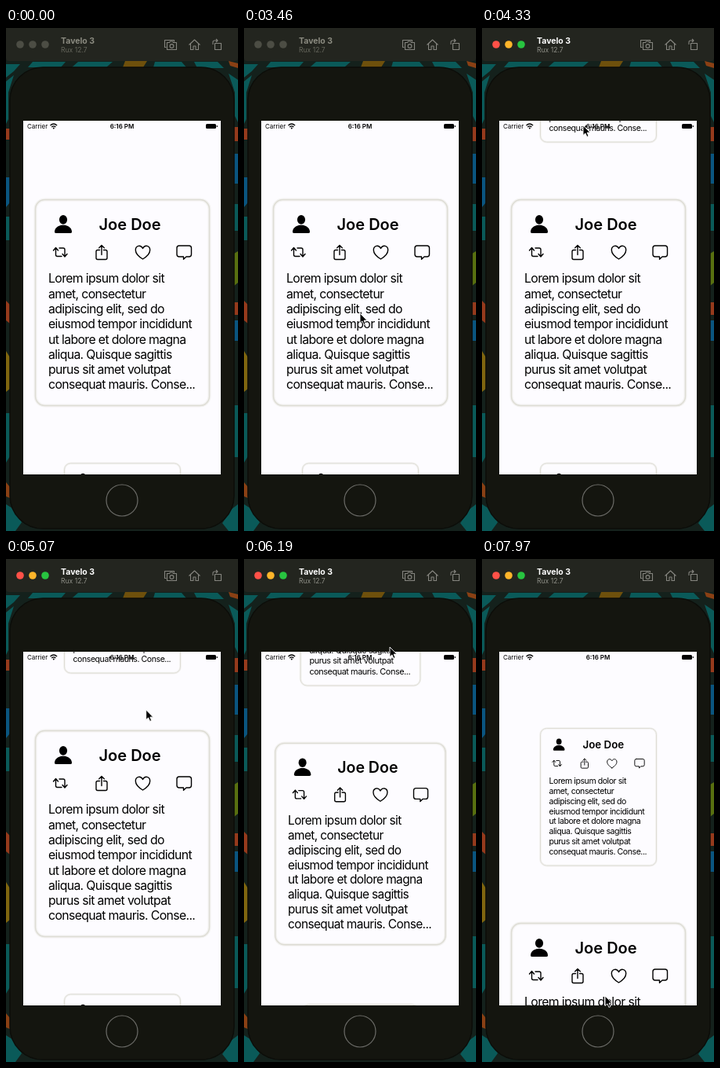
Animation, 296 px wide and 640 px high, one loop 7.99 s. Source, as an HTML page:

```html
<!DOCTYPE html>
<html lang="en">
<head>
<meta charset="utf-8">
<title>Card carousel</title>
<style>
  html, body { margin: 0; width: 100%; height: 100%; overflow: hidden; background: #14150f; }
  svg { display: block; width: 100vw; height: 100vh; font-family: Inter, "Open Sans", sans-serif; }
  .line { fill: none; stroke: #000; stroke-width: 1.4; stroke-linecap: round; stroke-linejoin: round; }
  .tool { fill: none; stroke: #85857f; stroke-width: 1.1; stroke-linejoin: round; }
  .name { font-size: 20px; font-weight: 600; }
  .body { font-size: 15.8px; letter-spacing: -0.04em; }
  .status { font-size: 8px; }
  .light { fill: #4c4d44; }
  .heading { font-size: 10.5px; font-weight: 700; fill: #8b8b80; }
  .sub { font-size: 8.6px; fill: #66675d; }
  .active .heading { fill: #fff; }
  .active .sub { fill: #8f9088; }
  .active .red { fill: #ff5148; }
  .active .amber { fill: #ffb52a; }
  .active .green { fill: #28c440; }
</style>
</head>
<body>
<svg viewBox="0 0 296 640" preserveAspectRatio="none">
  <defs>
    <clipPath id="screen"><rect x="22" y="118" width="252" height="450"/></clipPath>
    <g id="card">
      <g transform="translate(-148.5 -349.5)">
        <rect x="37.5" y="218.5" width="222" height="262" rx="12" fill="#fdfcff" stroke="#f3f2f1" stroke-width="4"/>
        <rect x="37.5" y="218.5" width="222" height="262" rx="12" fill="none" stroke="#dddcd4" stroke-width="1.4"/>
        <ellipse cx="73" cy="243.8" rx="5.1" ry="5.9"/>
        <path d="M62 259.5c0-6 6-8.7 11-8.7s11 2.7 11 8.7q0 1.5-2 1.5H64q-2 0-2-1.5z"/>
        <text class="name" x="118.5" y="257">Joe Doe</text>
        <path class="line" d="M60.5 283l3-3.5 3 3.5M63.5 280v8.5q0 2 2 2H71M68 280h5q2 0 2 2v8.5M72 287.500l3 3.500 3-3.500"/>
        <path class="line" d="M119.500 282.500H117q-2 0-2 2v8q0 2 2 2h10q2 0 2-2v-8q0-2-2-2h-2.500M122 288.500v-12M118.700 279.700l3.300-3.300 3.300 3.300"/>
        <path class="line" d="M174.500 294c-5-3-9.200-7-9.200-11.500 0-5.800 6.700-7.200 9.200-2 2.500-5.200 9.200-3.800 9.200 2 0 4.500-4.200 8.500-9.200 11.500z"/>
        <path class="line" d="M221 277h12.500q3 0 3 3v8q0 3-3 3H230l-3.500 3.200V291H221q-3 0-3-3v-8q0-3 3-3z"/>
        <g id="lines" class="body"></g>
      </g>
    </g>
  </defs>

  <rect width="296" height="640" fill="#14211c"/>
  <g id="wallpaper"></g>

  <rect x="5" y="50" width="286" height="587" rx="42" fill="#14150f" stroke="#0c0d09" stroke-width="1.5"/>
  <circle cx="148" cy="601" r="20" fill="none" stroke="#6c6c68" stroke-width="1.2"/>

  <g id="bar">
    <path d="M0 0H296V38q0 4-4 4H4q-4 0-4-4z" fill="#23251f"/>
    <circle class="light red" cx="18" cy="21" r="4.8"/>
    <circle class="light amber" cx="34" cy="21" r="4.8"/>
    <circle class="light green" cx="50" cy="21" r="4.8"/>
    <text class="heading" x="70" y="20">Tavelo 3</text>
    <text class="sub" x="70" y="31">Rux 12.7</text>
    <g class="tool">
      <path d="M204.500 24.500H202.500V15.500H214.500V17.500M205.500 18.500h3l1-1.500h3l1 1.500h4v9h-12z"/>
      <circle cx="211.5" cy="23" r="2.4"/>
      <path d="M233.500 21.500l7-6.500 7 6.500M235.500 20v7.500h3.500V23h3v4.500h3.500V20"/>
      <path d="M266.500 19.500h8v8h-8zM264 21v-3q0-2 2-2h4M268 14l2 2-2 2"/>
    </g>
  </g>

  <g clip-path="url(#screen)">
    <rect x="22" y="118" width="252" height="450" fill="#fdfcff"/>
    <g id="cards"></g>
    <g class="status">
      <text x="27" y="128">Carrier</text>
      <text x="148" y="128" text-anchor="middle" font-weight="600">6:16 PM</text>
      <path d="M56.500 124q4.300-4 8.600 0M58.200 126q2.600-2.300 5.200 0" fill="none" stroke="#000" stroke-width="1.3"/>
      <circle cx="60.8" cy="127.6" r="1"/>
      <rect x="255" y="122" width="13" height="6" rx="1.5"/>
      <rect x="268.7" y="124" width="1.2" height="2" rx=".5"/>
    </g>
  </g>

  <path id="cursor" d="M0 0V12.500L2.900 9.900 4.900 14.400 7 13.500 5.100 9.100H9z" fill="#000" stroke="#fff" stroke-width=".9" stroke-linejoin="round"/>
</svg>

<script>
const LOOP = 7990, PITCH = 291.7, CENTER = { x: 148.5, y: 349.5 };
const $ = id => document.getElementById(id);

function add(parent, tag, attrs, text = '') {
  const el = document.createElementNS('http://www.w3.org/2000/svg', tag);
  for (const key in attrs) el.setAttribute(key, attrs[key]);
  el.textContent = text;
  return parent.appendChild(el);
}

['Lorem ipsum dolor sit', 'amet, consectetur', 'adipiscing elit, sed do',
 'eiusmod tempor incididunt', 'ut labore et dolore magna', 'aliqua. Quisque sagittis',
 'purus sit amet volutpat', 'consequat mauris. Conse...'
].forEach((line, i) => add($('lines'), 'text', { x: 54, y: 324.3 + i * 19.3 }, line));

[
  ['#0a5a59', 'M0 46h18l-8 9-10 8zM34 43h42l-6 7H28zM92 43h44l-8 7H84zM190 43h34l6 7h-42zM240 43h30l8 8h-34z'],
  ['#6e500c', 'M152 42h28l-5 8h-26z'],
  ['#0a5a59', 'M0 68l10-8-7 22v34l-3 6zM296 66l-12-8 8 24v30l4 8zM0 240h5v30H0zM291 224h5v34h-5zM0 490h5v55l-5 8zM291 480h5v66h-5z'],
  ['#0a5a59', 'M0 606l8 5 12 18-8 11H0zM296 606l-8 6-12 18 8 10h12z'],
  ['#0a5580', 'M0 190h5v32l-5 6zM291 160h5v38h-5zM291 372h5v26h-5z'],
  ['#587010', 'M291 287l5-3v40l-5 4z'],
  ['#963a1c', 'M0 347l5 5v24l-5-4zM291 349h5v16h-5zM0 128h5v14H0zM291 126h5v18h-5z'],
  ['#80660f', 'M0 411l5 8v40l-5 4z'],
  ['#8a4014', 'M0 578l5 6v14l-5-2zM284 42l12 3v6l-10-3z']
].forEach(([fill, d]) => add($('wallpaper'), 'path', { fill, d }));

// Each row: time, then values; rows are joined with a smooth ease.
const cursorPath = [
  [0, 310, 312], [1640, 310, 312], [1760, 284, 318], [2300, 150, 360], [2500, 148, 363],
  [3550, 148, 363], [3880, 129, 124], [4450, 129, 124], [5250, 186, 202], [5450, 186, 202],
  [5770, 186, 112], [6650, 186, 112], [7270, 163, 240], [7430, 158, 311], [7970, 157, 556]
];
const scrollPath = [
  [0, 0], [3550, 0], [3880, 239], [4230, PITCH], [5450, PITCH],
  [5770, PITCH + 90], [5870, PITCH + 90], [6250, PITCH * 2], [7430, PITCH * 2], [7970, PITCH * 2 - 245]
];
const focusPath = [[0, 0], [3880, 0], [4230, 1], [5870, 1], [6250, 2]];

function sample(path, t) {
  const next = path.findIndex(row => row[0] > t);
  if (next < 0) return path[path.length - 1].slice(1);
  const a = path[next - 1], b = path[next];
  const u = (t - a[0]) / (b[0] - a[0]), k = u * u * (3 - 2 * u);
  return a.slice(1).map((v, i) => v + (b[i + 1] - v) * k);
}

const cards = Array.from({ length: 5 }, () => add($('cards'), 'use', { href: '#card' }));

function draw(t) {
  const [scroll] = sample(scrollPath, t), [focus] = sample(focusPath, t);
  const [x, y] = sample(cursorPath, t);
  cards.forEach((card, i) => {
    const scale = (2 + Math.max(0, 1 - Math.abs(i - focus))) / 3;
    card.setAttribute('transform', `translate(${CENTER.x} ${CENTER.y + i * PITCH - scroll}) scale(${scale})`);
  });
  $('cursor').setAttribute('transform', `translate(${x} ${y})`);
  $('bar').classList.toggle('active', t >= 3550);
}

const start = performance.now();
function tick() {
  draw((performance.now() - start) % LOOP);
  requestAnimationFrame(tick);
}
tick();
</script>
</body>
</html>
```
